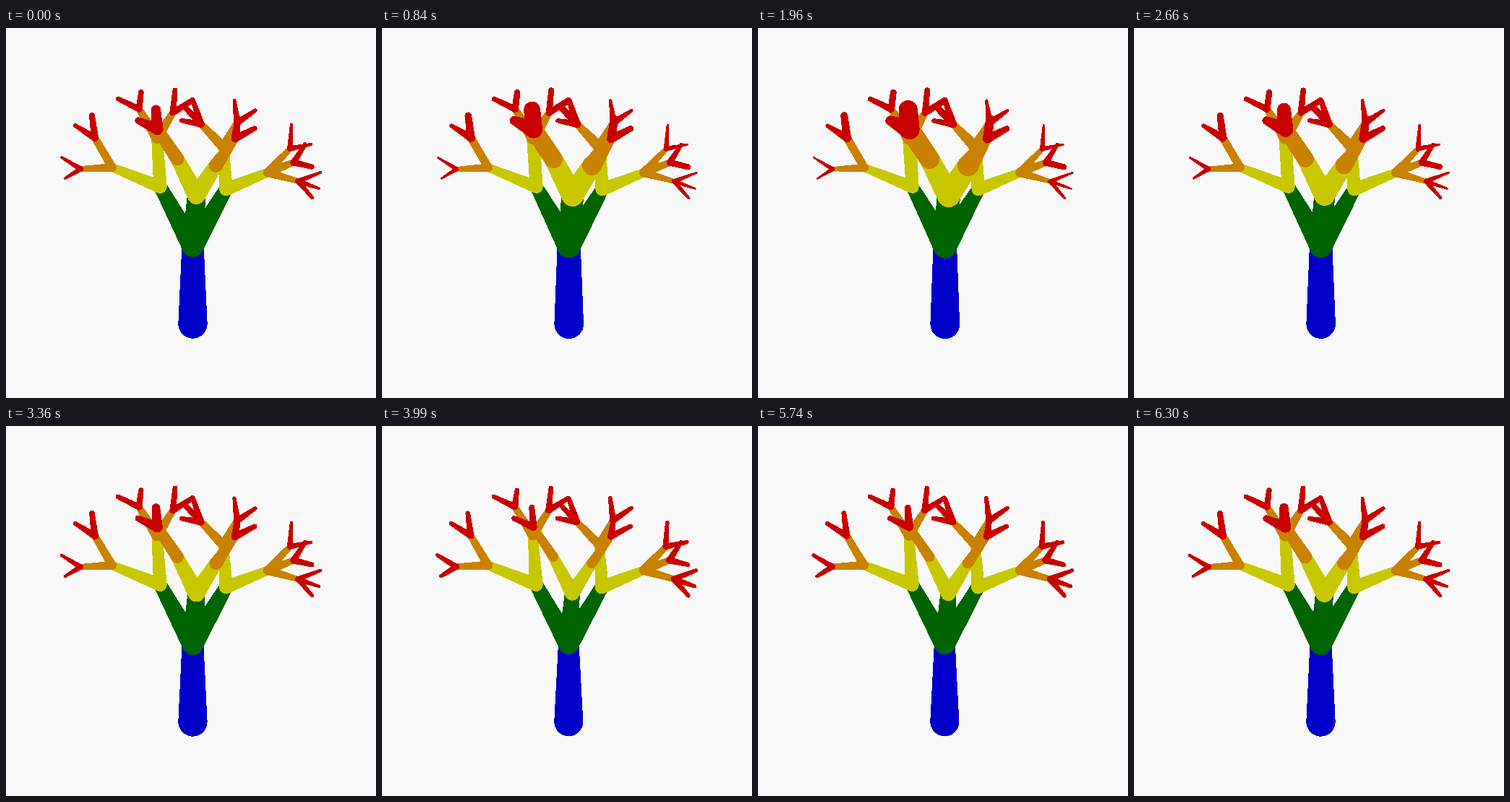
Write an HTML page that moves like this. It is 512x512 px and loops after 6.37 s.

```html
<!DOCTYPE html>
<html lang="en">
<head>
<meta charset="utf-8">
<title>Branching tree</title>
<style>
html, body { margin: 0; width: 100%; height: 100%; overflow: hidden; background: #f8f8f8; }
svg { display: block; width: 100vw; height: 100vh; }
</style>
</head>
<body>
<svg viewBox="0 0 512 512" shape-rendering="crispEdges"><g id="tree"></g></svg>
<script>
const STEP = 70, COUNT = 91;
const RADII = [20, 14, 9.6, 6.4, 4.6, 3.1];
const COLORS = ['#0000c8', '#006400', '#c8c800', '#c88200', '#c80000'];

// Joint at x, y; z tells how strongly its thickness reacts to depth
const n = (x, y, z, ...kids) => ({ x, y, z, kids });

const root = n(258.5, 409.5, .01,
  n(258.5, 302, .08,
    n(213.5, 219.7, -.04,
      n(147, 193, -.06,
        n(123, 152, .12, n(96, 135, -.05), n(119, 121, .25)),
        n(103, 195, -.2, n(77, 179, -.45), n(82, 208, -.45))),
      n(209, 152, .2,
        n(184, 112, .02, n(155, 98, .07), n(187, 89, .18)),
        n(231, 117, 0, n(234, 86, .12), n(258, 100, .2)))),
    n(304.5, 223, -.02,
      n(362, 200, -.02,
        n(393, 167, -.15, n(395, 134, -.4), n(422, 161, -.4)),
        n(398, 186, 0, n(414, 161, -.1), n(423, 192, .15)),
        n(404, 212, -.2, n(435, 200, -.42), n(433, 222, -.45), n(424, 235, -.25))),
      n(301, 165, .14,
        n(270, 133, .05, n(248, 110, .22), n(243, 128, 0), n(259, 101, .1)),
        n(320, 131, .06, n(316, 100, -.25), n(345, 114, -.15)))),
    n(263.5, 231.5, .27,
      n(237, 181, .4,
        n(209.5, 140, .57, n(183, 128, .42), n(207.5, 113, .75))),
      n(290.5, 190, .43,
        n(317, 153, .17, n(344, 139, .15), n(321, 126, .35))))));

const NS = 'http://www.w3.org/2000/svg';
const tree = document.getElementById('tree');
const layers = COLORS.map(fill => {
  const g = document.createElementNS(NS, 'g');
  g.setAttribute('fill', fill);
  return tree.appendChild(g);
});

const branches = [];
function grow(a, level) {
  for (const b of a.kids) {
    const path = layers[level].appendChild(document.createElementNS(NS, 'path'));
    branches.push({ a, b, level, path });
    grow(b, level + 1);
  }
}
grow(root, 0);

const disc = (x, y, r) =>
  `M${x - r} ${y}a${r} ${r} 0 1 0 ${2 * r} 0a${r} ${r} 0 1 0 ${-2 * r} 0z`;

function limb(a, b, ra, rb) {
  const dx = b.x - a.x, dy = b.y - a.y, len = Math.hypot(dx, dy);
  const nx = -dy / len, ny = dx / len;
  const side = (p, r) => `${p.x + nx * r} ${p.y + ny * r}`;
  return disc(a.x, a.y, ra) +
    `M${side(a, ra)}L${side(b, rb)}L${side(b, -rb)}L${side(a, -ra)}z` +
    (b.kids.length ? '' : disc(b.x, b.y, rb));
}

function draw(ms) {
  const frame = Math.floor(ms / STEP) % COUNT;
  const s = Math.sin(2 * Math.PI * frame / COUNT);
  const radius = (p, level) => RADII[level] * Math.exp(p.z * (s + 1));
  for (const { a, b, level, path } of branches)
    path.setAttribute('d', limb(a, b, radius(a, level), radius(b, level + 1)));
  tree.setAttribute('transform', `translate(${.3 * s} ${.3 * s})`);
}

function tick() {
  draw(performance.now());
  requestAnimationFrame(tick);
}
tick();
</script>
</body>
</html>
```
